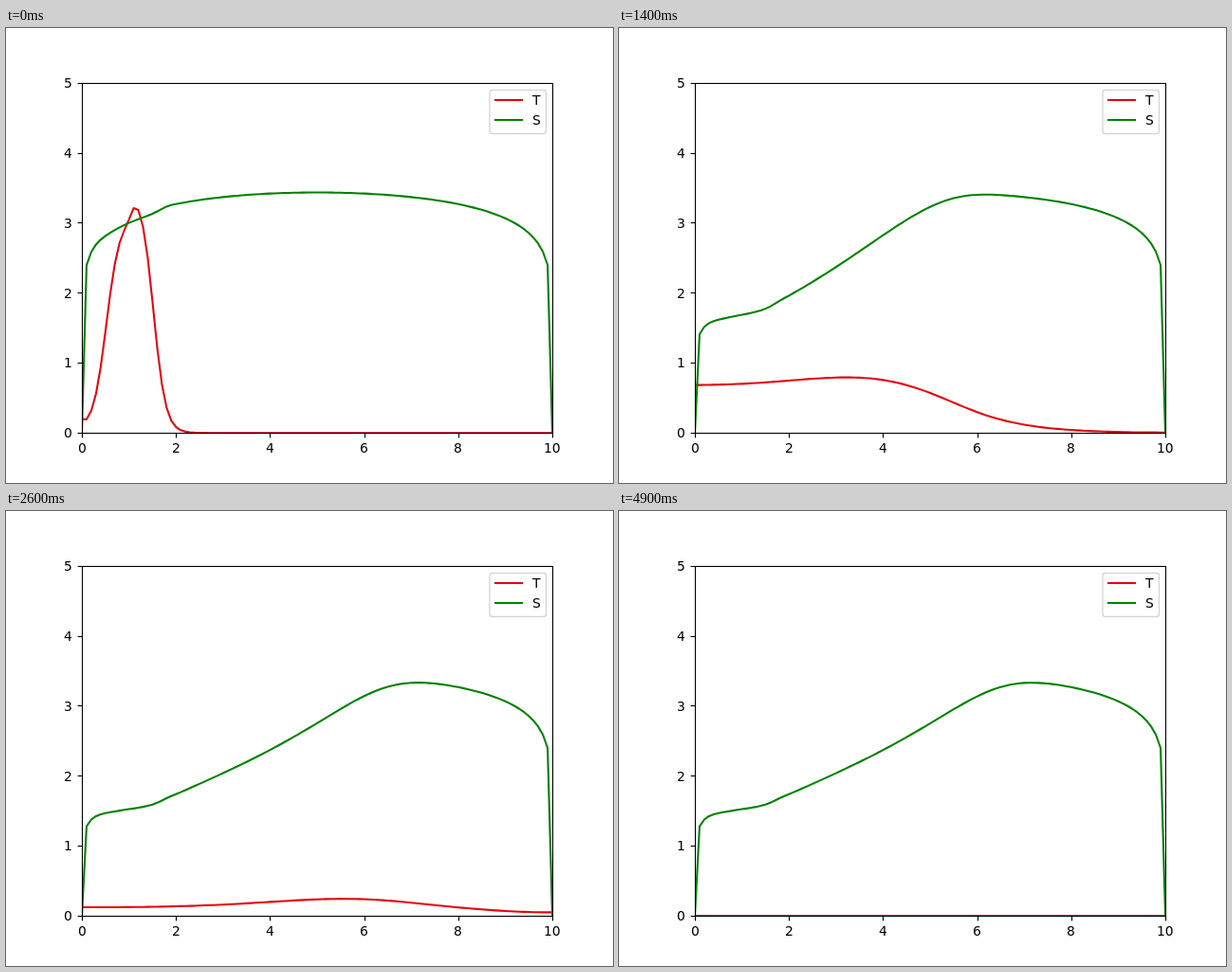
An HTML page with a canvas that plays this animation: 640 by 480 pixels, repeating every 5 s.

```html
<!DOCTYPE html>
<html lang="en">
<head>
<meta charset="utf-8">
<title>Temperature and fuel</title>
<style>
  html, body { margin: 0; width: 100%; height: 100%; overflow: hidden; background: #fff; }
  canvas { display: block; }
</style>
</head>
<body>
<canvas id="plot" width="640" height="480"></canvas>
<script>
const ctx = document.getElementById('plot').getContext('2d');
const FRAMES = 50, FRAME_MS = 100;
const N = 100, DX = 0.1, DT = 0.001;
const DIFFUSION = 2, WIND = 2, HEAT = 2, COOLING = 2, BURNT = 0.03;
const RED = '#e3060c', GREEN = '#008000';

const px = x => 80 + 49.6 * x;
const py = y => 427.2 - 73.92 * y;
const snap = v => Math.round(v) + 0.5;
const step = u => 1 / (1 + Math.exp(-u));
const burnRate = T => T > 0 ? Math.exp(-1 / T) : 0;
const grid = fn => Array.from({ length: N + 1 }, (_, i) => fn(i * DX));

// Hot spot between x = 0.5 and 1.5, a little hotter on its right side.
const spot = x => (3.1 + 0.4 * step(20 * (x - 1.05))) * step(7 * (x - 0.52)) * step(7.7 * (1.52 - x));
const startHeat = x => spot(Math.max(x, DX)) + spot(-Math.max(x, DX));

// Domed fuel bed, slightly burnt under the hot spot.
const startFuel = x => {
  const bed = 2.4 * Math.pow(Math.max(0, x * (10 - x)), 1 / 9);
  return bed * (1 - BURNT * burnRate(startHeat(x)));
};

// Heat reacts, diffuses and drifts with the wind; fuel burns away.
function simulate() {
  let T = grid(startHeat);
  const S = grid(startFuel);
  const frames = [];
  const steps = Math.round(FRAME_MS / 1000 / DT);
  for (let f = 0; f < FRAMES; f++) {
    frames.push({ heat: T, fuel: S.slice() });
    for (let s = 0; s < steps; s++) {
      const next = T.slice();
      for (let i = 1; i < N; i++) {
        const burn = S[i] * burnRate(T[i]);
        const bend = (T[i + 1] - 2 * T[i] + T[i - 1]) / (DX * DX);
        const slope = (T[i] - T[i - 1]) / DX;
        next[i] += DT * (DIFFUSION * bend - WIND * slope + HEAT * burn - COOLING * T[i]);
        S[i] -= DT * burn;
      }
      next[0] = next[1];
      next[N] = next[N - 1];
      T = next;
    }
  }
  return frames;
}

const frames = simulate();

function line(points, color, width) {
  ctx.beginPath();
  for (const [x, y] of points) ctx.lineTo(x, y);
  ctx.strokeStyle = color;
  ctx.lineWidth = width;
  ctx.stroke();
}

function curve(values, color) {
  line(values.map((v, i) => [px(i * DX), py(v)]), color, 2.083);
}

// Places text on whole pixels; anchor 0 is left, 0.5 centre, 1 right.
function label(text, x, y, anchor) {
  const left = x - anchor * ctx.measureText(text).width;
  ctx.fillText(text, Math.round(left), Math.round(y));
}

function drawAxes() {
  ctx.lineCap = 'butt';
  ctx.fillStyle = '#000';
  for (let x = 0; x <= 10; x += 2) {
    const at = snap(px(x));
    line([[at, 427.5], [at, 432.4]], '#000', 1.11);
    label(x, px(x), 448, 0.5);
  }
  for (let y = 0; y <= 5; y++) {
    const at = snap(py(y));
    line([[75.6, at], [80.5, at]], '#000', 1.11);
    label(y, 70.3, py(y) + 5.2, 1);
  }
  ctx.strokeRect(80.5, 58.5, 496, 369);
}

function drawLegend() {
  ctx.beginPath();
  ctx.roundRect(510, 65.5, 59.5, 46, 2.8);
  ctx.fillStyle = 'rgba(255,255,255,0.8)';
  ctx.fill();
  ctx.strokeStyle = 'rgba(204,204,204,0.8)';
  ctx.lineWidth = 1.39;
  ctx.stroke();
  ctx.lineCap = 'square';
  ctx.fillStyle = '#000';
  [['T', RED, 76], ['S', GREEN, 97]].forEach(([name, color, y]) => {
    line([[516, y], [544, y]], color, 2.083);
    label(name, 554.8, y + 5, 0);
  });
}

function draw() {
  const { heat, fuel } = frames[Math.floor(performance.now() % (FRAMES * FRAME_MS) / FRAME_MS)];
  ctx.fillStyle = '#fff';
  ctx.fillRect(0, 0, 640, 480);
  ctx.font = '13.89px "DejaVu Sans", sans-serif';
  ctx.lineJoin = 'round';
  ctx.save();
  ctx.beginPath();
  ctx.rect(80, 58, 496, 369.5);
  ctx.clip();
  curve(heat, RED);
  curve(fuel, GREEN);
  ctx.restore();
  ctx.lineJoin = 'miter';
  drawAxes();
  drawLegend();
  requestAnimationFrame(draw);
}
draw();
</script>
</body>
</html>
```
